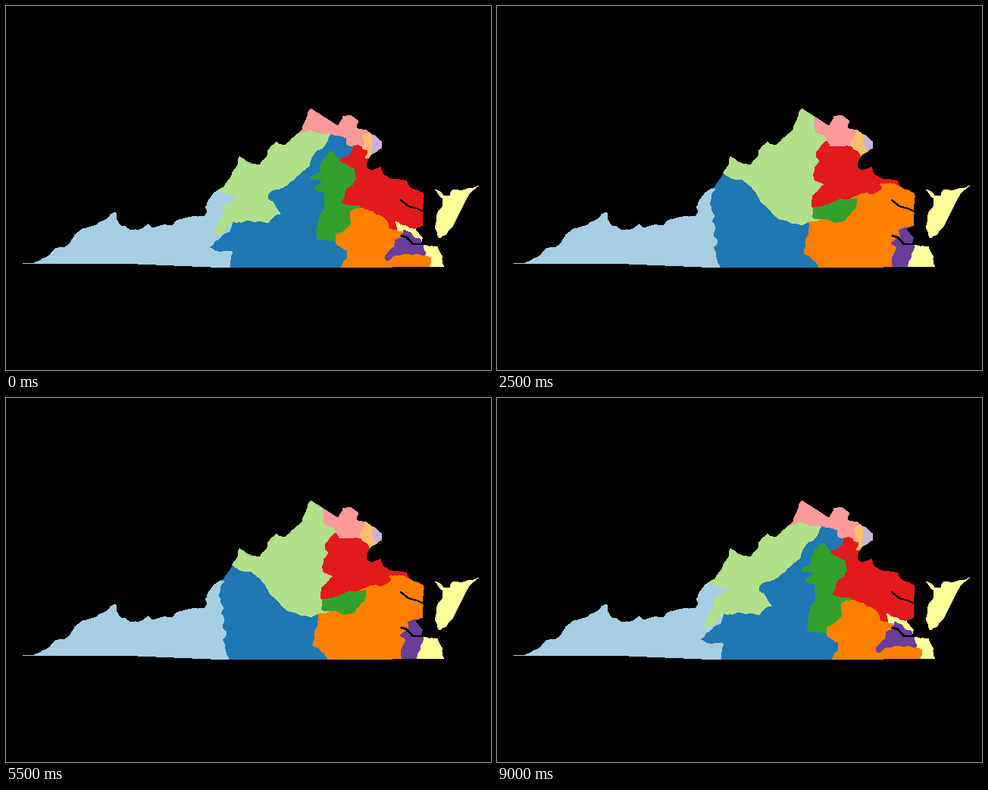
Animation, 640 px wide and 480 px high, one loop 10000 ms. Source, as a matplotlib script:

```python
import math
import random

import matplotlib.pyplot as plt
from matplotlib.animation import FuncAnimation
from matplotlib.patches import PathPatch, Polygon
from matplotlib.path import Path

W, H = 640, 480
(SKY, BLUE, LIME, GREEN, PINK, RED,
 TAN, ORANGE, LILAC, PURPLE, YELLOW) = plt.get_cmap("Paired").colors[:11]

rng = random.Random(4)


def split(a, b, wobble):
    """Fractal line from a up to, but not including, b."""
    (x0, y0), (x1, y1) = a, b
    if math.dist(a, b) < 4:
        return [a]
    k = rng.uniform(-wobble, wobble)
    mid = ((x0 + x1) / 2 - k * (y1 - y0), (y0 + y1) / 2 + k * (x1 - x0))
    return split(a, mid, wobble) + split(mid, b, wobble)


def rough(points, wobble):
    """Roughen a closed ring; long survey lines stay straight."""
    ring = []
    for a, b in zip(points, points[1:] + points[:1]):
        ring += [a] if math.dist(a, b) > 40 else split(a, b, wobble)
    return ring


def side(border, x=None, y=None):
    """Area between a border and the line at x or y."""
    ends = [(px if x is None else x, py if y is None else y)
            for px, py in (border[0], border[-1])]
    return [ends[0], *border, ends[1]]


# Outline of the mainland, clockwise from the western tip.
ridge = [
    (22, 339), (58, 327), (65, 319), (77, 318), (90, 301), (116, 289),
    (144, 271), (147, 274), (146, 280), (152, 289), (158, 289), (165, 295),
    (176, 294), (187, 286), (194, 292), (220, 288), (224, 283), (245, 277),
    (262, 276), (265, 272), (262, 266), (270, 251), (287, 238), (298, 219),
    (308, 197), (324, 207), (335, 208), (345, 190), (357, 178), (366, 183),
    (380, 172), (390, 163), (402, 134),
]
coast = [
    (438, 157), (444, 145), (456, 144), (466, 152), (463, 160), (476, 163),
    (496, 178), (496, 188), (481, 198), (476, 212), (482, 216), (496, 211),
    (499, 222), (529, 230), (533, 238), (552, 247), (550, 267), (551, 290),
    (541, 294), (551, 305), (547, 315), (570, 316), (579, 344),
]
south = [(510, 345), (270, 345), (150, 340), (22, 341)]
shore = [
    (566, 242), (577, 250), (586, 251), (589, 243), (624, 237), (608, 253),
    (588, 292), (572, 306), (566, 292), (568, 278), (577, 263), (576, 253),
]

# Painted in order, so each area only needs the borders left in view.
backdrop = [(200, 100), (W, 100), (W, 360), (200, 360)]
before = [
    (BLUE, backdrop),
    (SKY, side([(290, 230), (310, 252), (295, 297), (277, 309), (268, 319),
                (299, 325), (297, 350)], x=0)),
    (LIME, side([(280, 243), (297, 249), (309, 252), (299, 258), (286, 265),
                 (287, 274), (273, 302), (286, 300), (300, 284), (320, 282),
                 (345, 286), (362, 274), (346, 255), (347, 247), (378, 230),
                 (400, 211), (405, 197), (428, 169)], y=120)),
    (GREEN, [(432, 191), (440, 203), (480, 220), (480, 290), (440, 313),
             (410, 307), (411, 288), (420, 268), (420, 246), (407, 239),
             (418, 231), (401, 227), (416, 218), (414, 211)]),
    (RED, side([(459, 184), (452, 198), (440, 203), (460, 214), (463, 228),
                (449, 243), (443, 259), (467, 262), (480, 305)], x=560)),
    (PINK, side([(388, 168), (401, 163), (428, 168), (449, 174), (450, 184),
                 (462, 183), (478, 190), (500, 185)], y=120)),
    (LILAC, side([(483, 168), (482, 190), (484, 200)], x=505)),
    (TAN, [(470, 171), (476, 168), (482, 171), (482, 185), (480, 202),
           (474, 200), (478, 190), (470, 187), (474, 182)]),
    (ORANGE, side([(442, 345), (451, 331), (451, 322), (435, 313),
                   (435, 302), (455, 288), (456, 270), (467, 266),
                   (502, 283), (506, 294), (520, 296), (562, 333),
                   (560, 345)], y=360)),
    (YELLOW, [(514, 284), (528, 290), (538, 295), (545, 292), (580, 300),
              (580, 350), (560, 350), (562, 333), (553, 328), (523, 297),
              (516, 295)]),
    (PURPLE, [(524, 295), (538, 305), (546, 307), (554, 326), (551, 329),
              (528, 326), (503, 336), (500, 332), (512, 318), (513, 310),
              (521, 306)]),
]
after = [
    (ORANGE, backdrop),
    (BLUE, side([(411, 200), (411, 287), (403, 326), (411, 330),
                 (424, 350)], x=0)),
    (SKY, side([(288, 241), (281, 258), (287, 276), (283, 285), (288, 292),
                (285, 302), (291, 310), (285, 318), (295, 350)], x=0)),
    (LIME, side([(296, 219), (324, 229), (340, 244), (357, 266), (388, 286),
                 (402, 289), (412, 284), (440, 270)], y=120)),
    (RED, side([(434, 178), (421, 197), (426, 204), (419, 213), (420, 230),
                (432, 236), (417, 250), (417, 266), (445, 263), (482, 246),
                (495, 248), (508, 240), (504, 235), (536, 238)], x=545)),
    (PINK, side([(419, 147), (420, 165), (432, 170), (440, 185), (468, 184),
                 (480, 180)], y=120)),
    (TAN, side([(478, 160), (466, 183), (478, 193), (480, 205)], x=505)),
    (LILAC, side([(487, 165), (483, 181), (492, 200)], x=505)),
    (GREEN, [(418, 265), (440, 261), (455, 255), (475, 254), (472, 268),
             (460, 282), (446, 286), (417, 279)]),
    (PURPLE, side([(541, 293), (530, 296), (532, 304), (520, 313),
                   (527, 318), (521, 338), (524, 350)], x=560)),
    (YELLOW, side([(552, 314), (542, 350)], x=600)),
]
rivers = [
    (0.7, [(521, 256), (531, 264), (542, 267), (549, 270)]),
    (1.2, [(522, 303), (529, 305), (537, 314), (546, 314)]),
]


def add_area(points, color, zorder, wobble):
    return ax.add_patch(Polygon(rough(points, wobble), fc=color, lw=0,
                                zorder=zorder, antialiased=False))


def draw_map(regions):
    return [add_area(points, color, 1, 0.12) for color, points in regions]


def draw_sea():
    """Cover everything outside the mainland, then add rivers and shore."""
    land = rough(ridge + coast + south, 0.1)
    frame = [(-9, -9), (-9, H + 9), (W + 9, H + 9), (W + 9, -9)]
    rings = [Path(ring + ring[:1], closed=True) for ring in (frame, land)]
    ax.add_patch(PathPatch(Path.make_compound_path(*rings), fc="black", lw=0,
                           zorder=2, antialiased=False))
    for width, course in rivers:
        ax.plot(*zip(*course), color="black", lw=width, zorder=3,
                antialiased=False)
    add_area(shore, YELLOW, 3, 0.1)


fig = plt.figure(figsize=(W / 100, H / 100), dpi=100, facecolor="black")
ax = fig.add_axes([0, 0, 1, 1])
old_map = draw_map(before)
new_map = draw_map(after)
draw_sea()
ax.set_xlim(0, W)
ax.set_ylim(H, 0)
ax.axis("off")


def update(i):
    show_new = i in (1, 2)
    for patch in old_map:
        patch.set_visible(not show_new)
    for patch in new_map:
        patch.set_visible(show_new)
    return old_map + new_map


anim = FuncAnimation(fig, update, frames=4, interval=2500, repeat=True,
                     repeat_delay=0)
plt.show()
```
